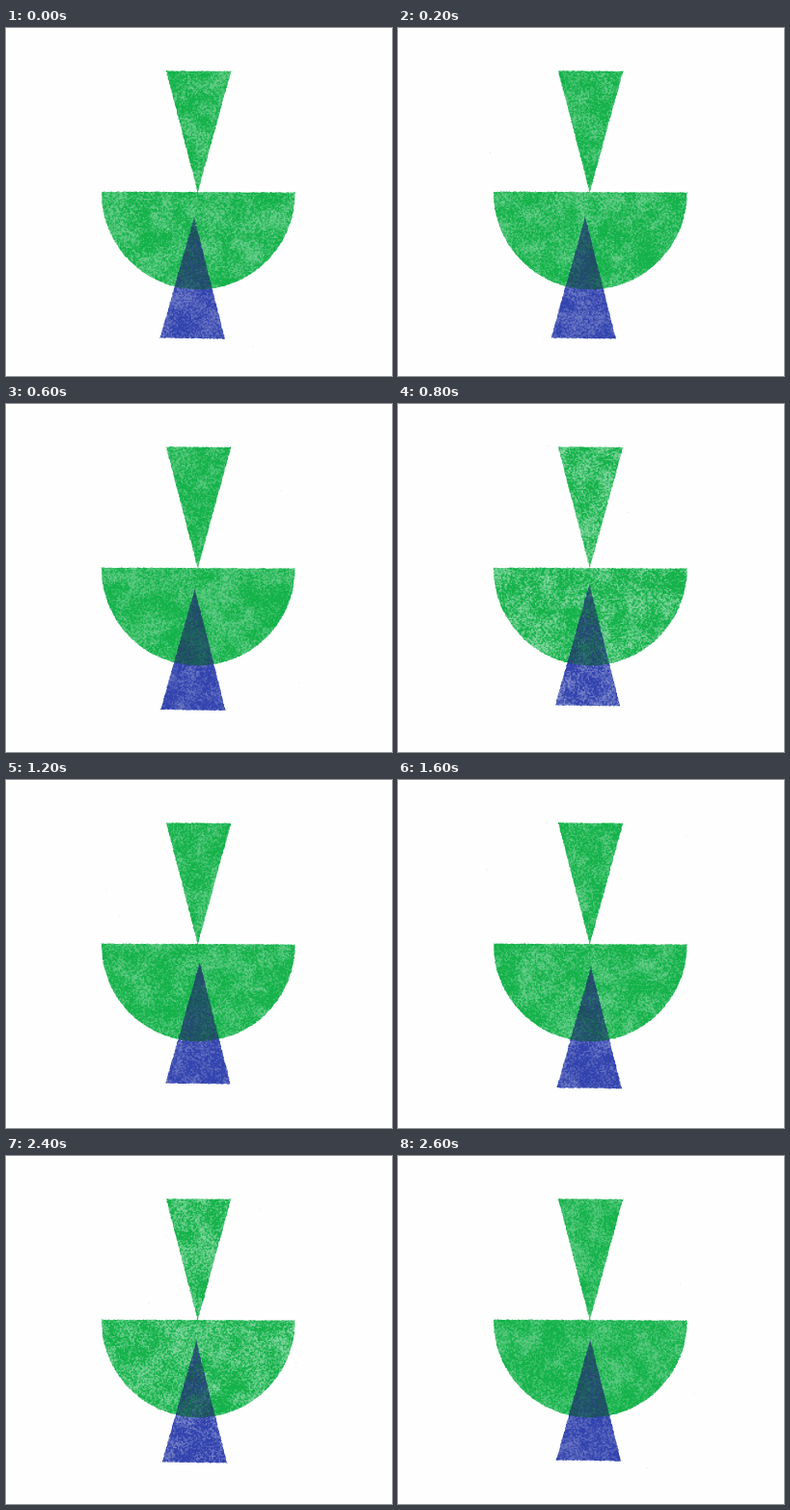
Write an HTML page with a canvas that moves like this. It is 400 px wide and 361 px high and loops after 2.8 s.

```html
<!DOCTYPE html>
<html lang="en">
<head>
<meta charset="utf-8">
<title>Riso shapes</title>
<style>
  html, body { margin: 0; width: 100%; height: 100%; overflow: hidden; background: #fefefe; }
  canvas { display: block; }
</style>
</head>
<body>
<canvas id="stage" width="400" height="361"></canvas>
<script>
const W = 400, H = 361, STEP = 200, STEPS = 14;
const ctx = document.getElementById('stage').getContext('2d');

const PAPER = [254, 254, 254], GREEN = [20, 178, 74], BLUE = [50, 67, 174], OVERLAP = [30, 78, 95];
const TRIANGLE = { halfWidth: 33.6, height: 126 };

// Wandering tip of the blue triangle: step, x, y
const path = [
  [0, 195, 196], [2, 193, 196], [4, 198.3, 187], [6, 200.8, 189],
  [8, 200, 193.7], [10, 193, 196], [13, 199.3, 190], [STEPS, 195, 196]
];

const clamp = v => Math.max(0, Math.min(1, v));
const mix = (a, b, t) => a + (b - a) * t;

function tipAt(step) {
  const i = path.findIndex(key => key[0] > step);
  const [t0, x0, y0] = path[i - 1], [t1, x1, y1] = path[i];
  const t = (step - t0) / (t1 - t0);
  return [mix(x0, x1, t), mix(y0, y1, t)];
}

function hash(x, y, seed) {
  let h = Math.imul(x, 374761393) + Math.imul(y, 668265263) + Math.imul(seed, 974634721);
  h = Math.imul(h ^ (h >>> 13), 1274126177);
  return ((h ^ (h >>> 16)) >>> 0) / 4294967296;
}

function noise(x, y, size, seed) {
  x /= size; y /= size;
  const i = Math.floor(x), j = Math.floor(y), u = x - i, v = y - j;
  return mix(mix(hash(i, j, seed), hash(i + 1, j, seed), u),
             mix(hash(i, j + 1, seed), hash(i + 1, j + 1, seed), u), v);
}

// Ink left on the paper: fine speckle over soft worn patches
function grain(x, y, seed, wear) {
  const n = .62 * noise(x, y, 1.25, seed) + .38 * noise(x, y, 12, seed + 50);
  return 1 - wear * clamp((n - .36) / .42);
}

// Inside distance of a tilted triangle; dir 1 widens downwards, -1 upwards
function triangle(x, y, tipX, tipY, dir, tilt) {
  const { halfWidth, height } = TRIANGLE;
  const dx = x - tipX + tilt * (y - tipY);
  const depth = (y - tipY - tilt * (x - tipX)) * dir;
  return Math.min(height - depth, (depth * halfWidth / height - Math.abs(dx)) * .966);
}

const bowl = (x, y) => Math.min(y - 170.2 - .004 * (x - 199.3), 100.2 - Math.hypot(x - 199.3, y - 171));

function render(step) {
  const [tipX, tipY] = tipAt(step);
  const seed = Math.round(tipX * 31 + tipY * 57);
  const wear = mix(.28, .5, hash(1, 1, seed));
  const image = ctx.createImageData(W, H);
  for (let y = 0; y < H; y++) for (let x = 0; x < W; x++) {
    const px = x + .5, py = y + .5;
    const rough = noise(px, py, 1.5, seed + 9);
    const greenEdge = Math.max(triangle(px, py, 198.7, 170.6, -1, .007), bowl(px, py));
    const green = clamp(greenEdge + rough) * grain(px, py, seed, wear);
    const blue = clamp(triangle(px, py, tipX, tipY, 1, .014) + rough) * grain(px, py, seed + 1, wear * .8);
    const at = (y * W + x) * 4;
    for (let c = 0; c < 3; c++)
      image.data[at + c] = mix(mix(PAPER[c], GREEN[c], green), mix(BLUE[c], OVERLAP[c], green), blue);
    image.data[at + 3] = 255;
  }
  const sheet = document.createElement('canvas');
  sheet.width = W;
  sheet.height = H;
  const pen = sheet.getContext('2d');
  pen.putImageData(image, 0, 0);
  // Faint dust around the shapes
  pen.fillStyle = '#e4e4e4';
  for (let i = 0; i < 4; i++)
    pen.fillRect(90 + 220 * hash(i, 2, seed), 30 + 315 * hash(i, 3, seed), 1, 1);
  return sheet;
}

const sheets = Array.from({ length: STEPS }, (_, step) => render(step));

function draw() {
  ctx.drawImage(sheets[Math.floor(performance.now() / STEP) % STEPS], 0, 0);
  requestAnimationFrame(draw);
}
draw();
</script>
</body>
</html>
```
